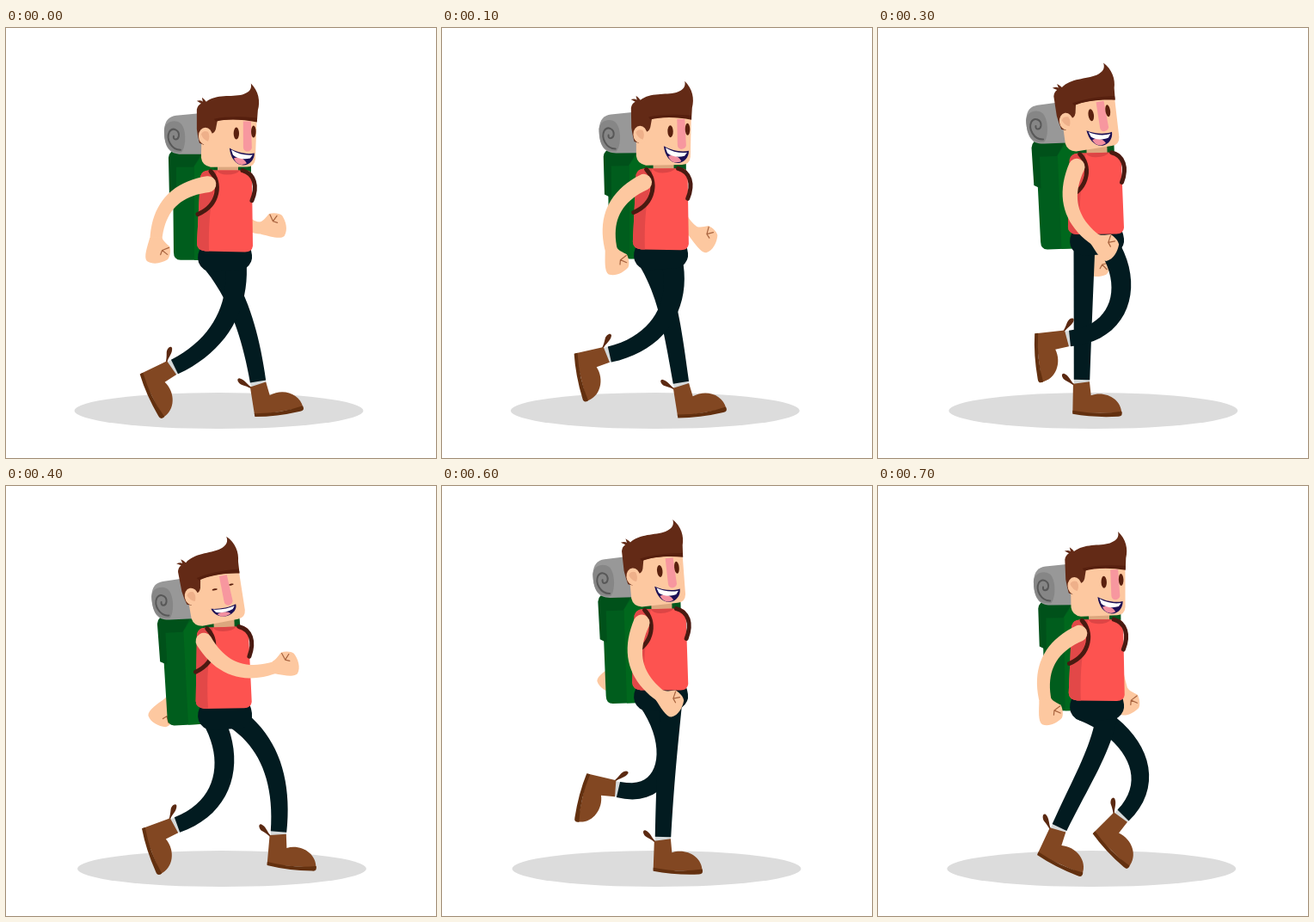
An HTML page for the animation above (800 ms loop, 500 by 500 pixels).

```html
<!DOCTYPE html>
<html lang="en">
<head>
<meta charset="utf-8">
<title>Walking hiker</title>
<style>
  html, body { margin: 0; width: 100%; height: 100%; overflow: hidden; background: #fff; }
  svg { display: block; width: 100%; height: 100%; }
  .skin { fill: #fdc8a0; }
  .dark { fill: #021b20; }
  .line { fill: none; stroke-linecap: round; stroke-linejoin: round; }
  .strap { stroke: #491a11; stroke-width: 5; }
  .crease { stroke: #a8643f; stroke-width: 1.2; }
</style>
</head>
<body>
<svg viewBox="0 0 500 500">
  <defs>
    <g id="boot">
      <path d="M-9 5C-13 2-15-5-21-7C-25-7-23-1-19 1C-15 3-13 4-9 7Z" fill="#5b2911"/>
      <rect x="-9" y="-3" width="18" height="9" rx="2" fill="#d5d9da"/>
      <path d="M-10 5L9 2L11 18C27 12 46 21 47 38L-10 39Z" fill="#824722"/>
      <path d="M-10 36Q20 41 47 36Q49 42 43 42Q15 44-10 40Z" fill="#63300f"/>
    </g>
    <g id="fist">
      <path class="skin" d="M-7-3L7-3C9 2 12 4 16 8C17 13 16 20 13 23C6 27-4 29-11 24C-15 19-10 7-7-3Z"/>
      <path class="line crease" d="M15 9L7 12L5 17M7 12L13 17"/>
    </g>
  </defs>

  <ellipse id="shadow" cy="445" rx="168" ry="21" fill="#dcdcdc"/>

  <path id="farArm" class="line" stroke="#fdc8a0" stroke-width="14"/>
  <use id="farHand" href="#fist"/>

  <g id="pack">
    <path d="M202 143H278Q285 145 285 153V190H200Z" fill="#00581d"/>
    <path d="M194 152Q195 143 204 143H242V271H203Q195 271 195 262Z" fill="#005d1d"/>
    <path d="M226 152L219 162V271H242V143Z" fill="#00681d"/>
    <path d="M189 152Q190 143 200 143H230L218 163H198V200L190 196Z" fill="#00511a"/>
    <path d="M184 120C185 108 190 104 198 103L230 100V148H204C190 148 184 140 184 120Z" fill="#989898"/>
    <path d="M184 120C185 110 196 107 203 112C210 118 210 139 204 146C190 147 184 139 184 120Z" fill="#868686"/>
    <path class="line" stroke="#585858" stroke-width="2" d="M203 143C192 143 186 130 190 122C194 116 202 120 201 127C200 132 194 132 195 127"/>
  </g>

  <use id="bootB" href="#boot"/>
  <path id="legB" class="dark"/>
  <use id="bootA" href="#boot"/>
  <path id="legA" class="dark"/>

  <path id="hips" class="dark" d="M228 254H283Q288 267 285 273Q280 284 268 283L240 285Q228 284 224 274Q221 264 228 254Z"/>

  <g id="torso">
    <path d="M246 152H270V172H246Z" fill="#dca77e"/>
    <path d="M226 174Q228 167 236 167H280Q286 168 286 174L287 255Q286 262 278 262L232 261Q222 260 222 252Z" fill="#fd5350"/>
    <path d="M226 174Q228 167 236 167H245L241 195Q235 220 236 261H232Q222 260 222 252Z" fill="#e24848"/>
    <path d="M245 167H272Q268 172 257 172Q248 172 245 167Z" fill="#dd4545"/>
    <path class="line strap" d="M238 168C250 180 249 207 223 218"/>
    <path class="line strap" d="M275 167C289 171 293 185 286 202"/>
  </g>

  <g id="head">
    <path class="skin" d="M228 100H292L290 154Q289 163 280 163H238Q228 161 227 152Z"/>
    <g id="face">
      <path d="M276 110H285L286 141Q285 145 280 145Q276 144 276 140Z" fill="#f7979f"/>
      <ellipse class="eye" cx="268" cy="124" rx="3.2" fill="#5a200e"/>
      <ellipse class="eye" cx="288" cy="122" rx="2.8" fill="#5a200e"/>
      <g id="mouth">
        <path d="M260 141C268 146 280 149 289 147C289 155 283 161 276 161C267 161 261 152 260 141Z" fill="#1c1055"/>
        <path d="M265 153C271 150 278 154 280 159C273 162 268 160 265 153Z" fill="#f28fa0"/>
        <path d="M262 143C270 148 279 150 287 149L284 153C276 155 268 153 264 149Z" fill="#fff"/>
      </g>
    </g>
    <path d="M222 119V96Q223 91 227 89L222 86Q227 85 229 87L228 82Q232 85 233 87C245 78 262 82 275 79C284 76 286 72 285 66C294 75 296 87 293 97L292 110C274 107 258 107 246 109L244 119Q242 125 237 124L230 137L225 135Q223 128 222 119Z" fill="#632a16"/>
    <path d="M244 110C256 107 274 107 292 111L292 106C272 104 256 104 242 107Z" fill="#561f0e"/>
    <ellipse class="skin" cx="232" cy="127" rx="8" ry="10"/>
    <path d="M227 125Q229 120 235 122Q238 127 235 133Q230 132 227 125Z" fill="#eeb08a"/>
  </g>

  <path id="nearArm" class="skin"/>
  <use id="nearHand" href="#fist"/>
</svg>

<script>
const STEP = 100, STEPS = 8, TURN = 2 * Math.PI;

// Key moments of the walk, in steps; a smooth closed curve joins them.
const KEYS = [0, 2, 3, 4, 6, 7];

const walk = {
  legA: { hip: 267, x: [196, 200, 223, 317, 257, 211], y: [394, 365, 361, 402, 408, 397], tilt: [64, 84, 84, 5, 2, 25] },
  legB: { hip: 240, x: [293, 258, 237, 199, 205, 285], y: [411, 409, 409, 394, 353, 383], tilt: [-9, 0, 1, 70, 103, 45] },
  nearSwing: [-43, -1, 15, 70, 15, -26],
  farSwing: [31, 8, -10, -51, -54, 11]
};

const el = id => document.getElementById(id);
const eyes = document.querySelectorAll(".eye");
const rad = deg => deg * Math.PI / 180;
const mix = (a, b, t) => a.map((v, i) => v + (b[i] - v) * t);

// Point at a distance from p; 0 degrees is straight down, positive is forward.
const reach = ([x, y], deg, length) => [x + length * Math.sin(rad(deg)), y + length * Math.cos(rad(deg))];

// Midpoint of a and b, pushed sideways from the line between them.
function bulge(a, b, amount) {
  const dx = b[0] - a[0], dy = b[1] - a[1], k = amount / Math.hypot(dx, dy);
  return [(a[0] + b[0]) / 2 + dy * k, (a[1] + b[1]) / 2 - dx * k];
}

function along(values, step) {
  const n = KEYS.length;
  const time = i => KEYS[(i + n) % n] + STEPS * Math.floor(i / n);
  const value = i => values[(i + n) % n];
  const slope = i => (value(i + 1) - value(i - 1)) / (time(i + 1) - time(i - 1));
  let i = n - 1;
  while (KEYS[i] > step) i--;
  const span = time(i + 1) - time(i), t = (step - time(i)) / span, u = 1 - t;
  return u * u * (1 + 2 * t) * value(i) + t * t * (1 + 2 * u) * value(i + 1)
    + span * t * u * (u * slope(i) - t * slope(i + 1));
}

function place(id, x, y, angle = 0, px = 0, py = 0) {
  el(id).setAttribute("transform", `translate(${x} ${y}) rotate(${angle} ${px} ${py})`);
}

// Tapered outline around a cubic curve, round at its start.
function limb(a, b, c, d, w0, w1) {
  const left = [], right = [], n = 20;
  for (let i = 0; i <= n; i++) {
    const t = i / n;
    const ab = mix(a, b, t), bc = mix(b, c, t), cd = mix(c, d, t);
    const from = mix(ab, bc, t), to = mix(bc, cd, t), [x, y] = mix(from, to, t);
    const dx = to[0] - from[0], dy = to[1] - from[1];
    const r = (w0 + (w1 - w0) * t) / 2 / Math.hypot(dx, dy);
    left.push(`${(x - dy * r).toFixed(2)} ${(y + dx * r).toFixed(2)}`);
    right.unshift(`${(x + dy * r).toFixed(2)} ${(y - dx * r).toFixed(2)}`);
  }
  return `M${left.join("L")}L${right.join("L")}A${w0 / 2} ${w0 / 2} 0 0 0 ${left[0]}Z`;
}

// The shin follows the boot; the knee takes up what the leg has to spare.
function drawLeg(id, boot, step, lift) {
  const { hip, x, y, tilt } = walk[id];
  const top = [hip, 273 + lift], ankle = [along(x, step), along(y, step)];
  const angle = along(tilt, step);
  const shin = reach(ankle, 180 - angle, 60);
  const gap = Math.hypot(ankle[0] - top[0], ankle[1] - top[1]);
  const knee = bulge(top, shin, .25 * Math.sqrt(Math.max(0, 152 ** 2 - gap ** 2)));
  el(id).setAttribute("d", limb(top, knee, shin, ankle, 25, 18.5));
  place(boot, ...ankle, angle);
}

function drawNearArm(step, sway, lift) {
  const swing = along(walk.nearSwing, step);
  const shoulder = [235 - 5 * sway, 183 + lift];
  const wrist = reach(shoulder, swing, 89);
  const elbow = bulge(shoulder, wrist, -36);
  el("nearArm").setAttribute("d",
    limb(shoulder, mix(shoulder, elbow, 2 / 3), mix(wrist, elbow, 2 / 3), wrist, 19, 14));
  place("nearHand", ...wrist, -38 - .85 * swing);
}

function drawFarArm(step, sway, lift) {
  const swing = along(walk.farSwing, step);
  const shoulder = [272, 189 + lift];
  const wrist = reach(shoulder, swing, 52 + 56 * sway);
  const curl = -.7 * swing - .075 * Math.max(0, swing) ** 2;
  const elbow = reach(wrist, -curl, -30);
  el("farArm").setAttribute("d", `M${shoulder}Q${elbow} ${wrist}`);
  place("farHand", ...wrist, curl);
}

function draw(step) {
  const sway = (1 - Math.cos((step - .2) / STEPS * TURN)) / 2;
  const gait = step - .4 * Math.sin(step / STEPS * TURN);
  const lift = -12 - 11.5 * Math.cos((gait - 2.25) / 4 * TURN) - 1.5 * sway;
  const open = Math.min(1, Math.abs(step - 4));

  el("shadow").setAttribute("cx", 247.5 + 3.5 * sway);
  place("torso", -sway, lift, -2 * sway, 254, 262);
  place("hips", 0, lift + 2 * sway);
  place("pack", -7 * sway, lift + 10 * sway, -3 * sway, 210, 271);
  place("head", -10 * sway, lift - 1.5 * sway, -11 * sway, 260, 163);
  place("face", -8 * sway, 0);

  drawLeg("legA", "bootA", step, lift);
  drawLeg("legB", "bootB", step, lift);
  drawNearArm(step, sway, lift);
  drawFarArm(step, sway, lift);

  eyes.forEach(e => e.setAttribute("ry", 1 + 6 * open));
  el("mouth").setAttribute("transform",
    `translate(275 148) rotate(${8 * open - 8}) scale(1 ${.7 + .3 * open}) translate(-275 -148)`);
}

let shown = -1;
function tick(now) {
  const step = Math.floor(now / STEP) % STEPS;
  if (step !== shown) draw(shown = step);
  requestAnimationFrame(tick);
}
draw(0);
requestAnimationFrame(tick);
</script>
</body>
</html>
```
